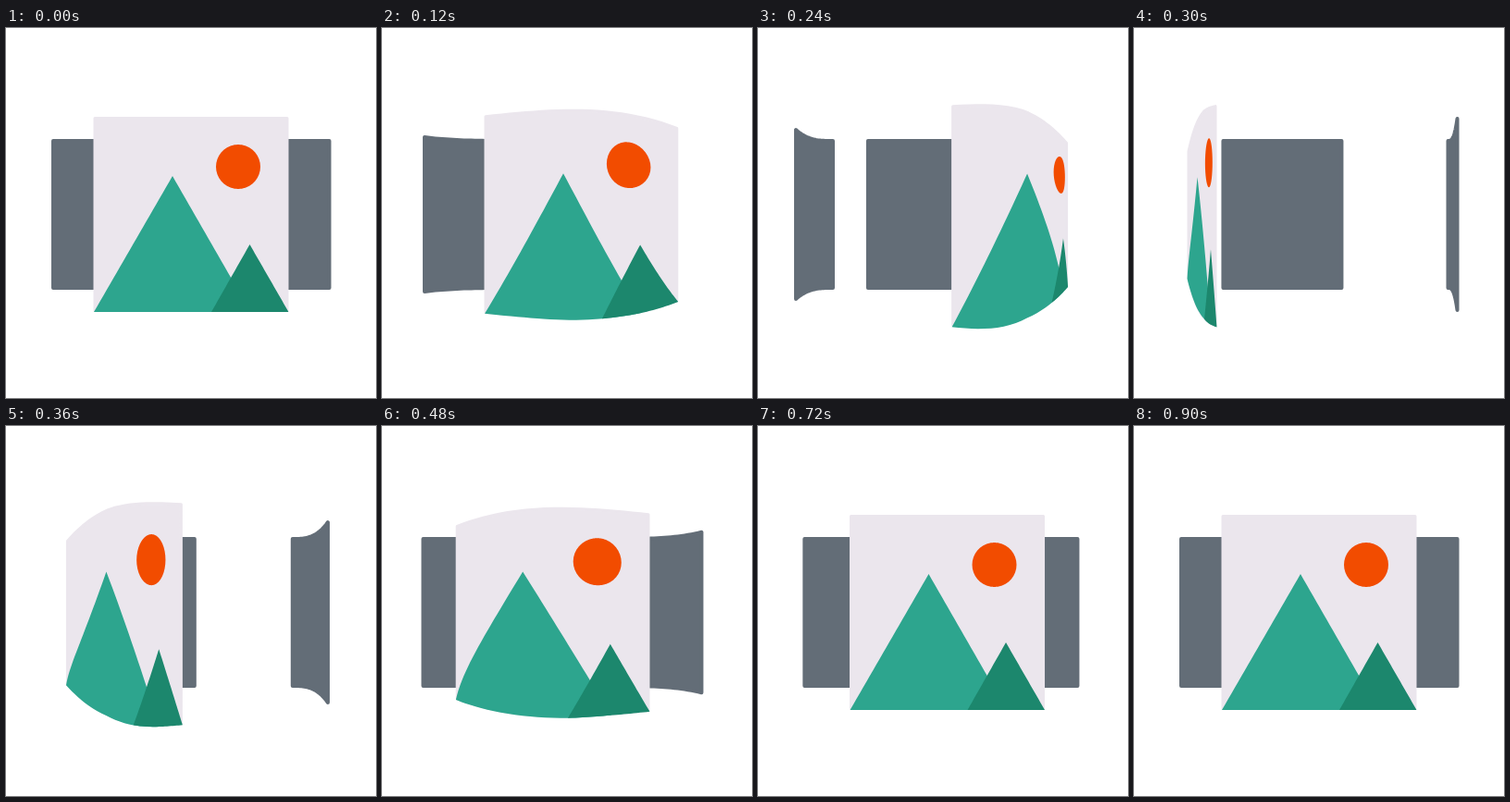
Animation of 400 by 400 pixels, one loop 3.23 s. Source, as an HTML page with a canvas:

```html
<!DOCTYPE html>
<html>
<head>
<meta charset="utf-8">
<style>
html, body { margin: 0; width: 100%; height: 100%; overflow: hidden; background: #fff; }
canvas { display: block; width: 400px; height: 400px; }
</style>
</head>
<body>
<canvas id="stage" width="400" height="400"></canvas>
<script>
const ctx = document.getElementById('stage').getContext('2d');
const LOOP = 3230, STEP = 30, END = 900;
const TURN = 300;  // the front card swaps with the next one here
const LEFT = 94.5, RIGHT = 305.5, WIDTH = RIGHT - LEFT;
const BACK_LEFT = 49, BACK_RIGHT = 351.5, BACK_WIDTH = 132;
const FACE_H = 105.5, BACK_H = 81.5, MID_Y = 201.5;

const clamp = p => Math.min(1, Math.max(0, p));
const smooth = p => (p = clamp(p), p * p * (3 - 2 * p));

// Maps u, v (v in -1..1) onto a bent card. The near edge stays flat on the
// track, the far edge goes round the turn; s runs from near to far.
function warp({ near, far, h0, h1, lift, place }, u, v) {
  const s = place(u);
  const h = h0 + lift * s - (lift + h0 - h1) * s ** 3;
  return [near + (far - near) * s, MID_Y + Math.max(0, h - 112) * .25 + v * h];
}

function shape(pose, points, color) {
  const n = 24;
  ctx.beginPath();
  points.forEach(([u, v], i) => {
    const [u2, v2] = points[(i + 1) % points.length];
    for (let j = 0; j < n; j++) {
      const p = j / n;
      ctx.lineTo(...warp(pose, u + (u2 - u) * p, v + (v2 - v) * p));
    }
  });
  ctx.closePath();
  ctx.fillStyle = ctx.strokeStyle = color;
  ctx.fill();
}

// The round-joined outline restores the inset and softens the corners
function panel(pose, r, color) {
  const inset = r * Math.sign(pose.far - pose.near);
  shape({
    ...pose,
    near: pose.near + inset, far: pose.far - inset,
    h0: pose.h0 - r, h1: pose.h1 - r
  }, [[0, -1], [1, -1], [1, 1], [0, 1]], color);
  ctx.lineWidth = 2 * r;
  ctx.lineJoin = 'round';
  ctx.stroke();
}

const local = (x, y) => [(x - LEFT) / WIDTH, (y - MID_Y) / FACE_H];
const mountain = [local(95, 307), local(180, 160), local(264.5, 307)];
const hill = [local(222, 307), local(263.5, 234), local(305.5, 307)];
const sun = Array.from({ length: 36 }, (_, i) => {
  const a = i * Math.PI / 18;
  return local(251 + 24 * Math.cos(a), 150 + 24 * Math.sin(a));
});

// bend: 0 flat in front, 1 edge-on at the turn
function drawFace(bend, leaving, sway) {
  const travel = 216 * bend ** 2.84;
  const reach = Math.min(travel, 37 * bend);
  const ratio = WIDTH / (WIDTH - travel + reach);
  const squeeze = u => u * ratio / (1 + (ratio ** 4 - 1) * u ** 4) ** .25;
  const bow = u => u + Math.min(.7, 2 * bend) * u ** 3 * (1 - u);
  const pose = {
    near: leaving ? LEFT + travel : RIGHT - travel + sway,
    far: leaving ? RIGHT + reach : LEFT - reach + sway,
    h0: Math.min(120, FACE_H + 28 * bend ** 3),
    h1: FACE_H - 36 * bend ** 1.3,
    lift: 95 * bend * (1 - 1.1 * bend),
    place: leaving ? squeeze : u => bow(1 - u)
  };
  panel(pose, 1.5, '#ebe6ed');
  shape(pose, sun, '#f24c00');
  shape(pose, mountain, '#2da58e');
  shape(pose, hill, '#1c876d');
}

function drawBack(near, far, flare = 0) {
  panel({ near, far, h0: BACK_H, h1: BACK_H + flare, lift: 0, place: u => u }, 2, '#636d77');
}

function frame(now) {
  const t = Math.min(END, Math.floor(now % LOOP / STEP) * STEP);
  const bend = clamp(1 - Math.abs(t - TURN) / TURN);
  const leaving = t < TURN;
  ctx.clearRect(0, 0, 400, 400);

  // One card crosses behind from right to left and springs back a little
  const x = BACK_RIGHT - BACK_WIDTH - 177 * (1 - (1 - clamp(t / 480)) ** 1.25) +
    6.5 * smooth((t - 480) / 300);
  drawBack(x, x + BACK_WIDTH);

  if (leaving) {
    drawBack(BACK_LEFT + BACK_WIDTH - 131 * bend ** 1.3, BACK_LEFT - 12.5 * bend, 17 * bend ** 1.6);
  } else {
    const recoil = 5 * Math.sin(Math.PI * (t - TURN) / 600);
    drawBack(BACK_RIGHT - BACK_WIDTH + 118 * bend ** 1.3, BACK_RIGHT - recoil, 24 * bend ** 1.3);
  }
  drawFace(bend, leaving, 4.75 * Math.sin(Math.PI * clamp((t - 600) / 300)));
}

const start = performance.now();
function tick() {
  frame(performance.now() - start);
  requestAnimationFrame(tick);
}
tick();
</script>
</body>
</html>
```
